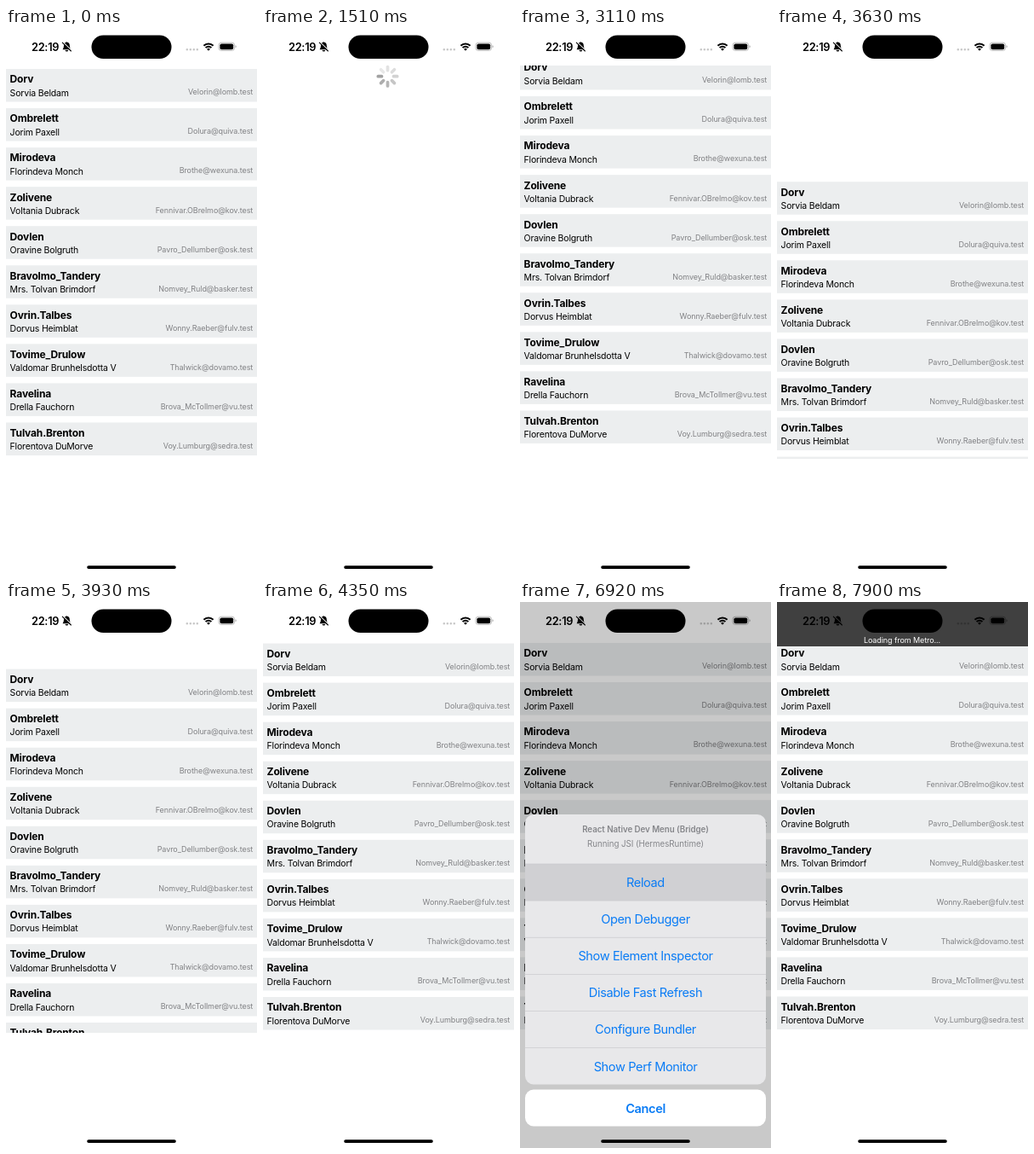
Write an HTML page that moves like this. It is 295 by 640 pixels and loops after 8 s.

```html
<!DOCTYPE html>
<html lang="en">
<head>
<meta charset="utf-8">
<title>User list with reload menu</title>
<style>
  html, body { margin: 0; width: 100%; height: 100%; overflow: hidden; background: #fff; }
  svg { display: block; width: 100%; height: 100%; font-family: Inter, Roboto, sans-serif; }
  .title { font-size: 12px; font-weight: 700; letter-spacing: -.15px; }
  .name { font-size: 10.5px; letter-spacing: -.18px; }
  .small { font-size: 9px; letter-spacing: -.08px; }
  .mail { fill: #808184; text-anchor: end; }
  .clock { font-size: 12.8px; font-weight: 600; letter-spacing: -.3px; }
  .mid { text-anchor: middle; }
  .head { font-size: 9.75px; letter-spacing: -.05px; fill: #85868a; }
  .button { font-size: 14.6px; letter-spacing: -.4px; fill: #0a7cf5; }
  .strong { font-weight: 600; }
</style>
</head>
<body>
<svg viewBox="0 0 295 640">
  <defs>
    <clipPath id="listArea"><rect y="44" width="295" height="461"/></clipPath>
    <clipPath id="sheetArea"><rect x="6" y="249" width="283" height="316.5" rx="10"/></clipPath>
    <mask id="slashGap" maskUnits="userSpaceOnUse" x="64" y="14" width="16" height="16">
      <rect x="64" y="14" width="16" height="16" fill="#fff"/>
      <path d="M66 15.8 L78 27.2" stroke="#000" stroke-width="1.3"/>
    </mask>
  </defs>
  <rect width="295" height="640" fill="#fff"/>
  <g id="listBox" clip-path="url(#listArea)"><g id="list"></g></g>
  <g id="spinner" stroke-width="3.7" stroke-linecap="round"></g>
  <g id="banner">
    <rect width="295" height="52" fill="#404040"/>
    <text class="small mid" x="147" y="47.5" fill="#fff">Loading from Metro...</text>
  </g>
  <rect id="dim" width="295" height="640"/>
  <g id="sheet">
    <g clip-path="url(#sheetArea)">
      <rect x="6" y="249" width="283" height="317" fill="#e8e8ea"/>
      <rect id="pressed" x="6" y="307" width="283" height="43" fill="#d0d0d3"/>
      <g id="buttons"></g>
    </g>
    <text class="head strong mid" x="147.5" y="269.5">React Native Dev Menu (Bridge)</text>
    <text class="head mid" x="147.5" y="286.5">Running JSI (HermesRuntime)</text>
    <rect x="6" y="571.5" width="283" height="43" rx="10" fill="#fff"/>
    <text class="button strong mid" x="147.5" y="598.5">Cancel</text>
  </g>
  <g id="status">
    <text class="clock" x="30" y="26.6">22:19</text>
    <g mask="url(#slashGap)">
      <path d="M66.6 25.3 Q68 23.6 68 20.6 Q68.2 17.4 70.3 17.1 Q71.4 15.6 72.5 17.1 Q74.6 17.4 74.8 20.6 Q74.8 23.6 76.2 25.3 Z"/>
      <path d="M69.6 26 a1.8 1.6 0 0 0 3.6 0 Z"/>
    </g>
    <path d="M66.3 17.2 L76.4 27" stroke="#000" stroke-width="1.1" stroke-linecap="round"/>
    <rect x="100.5" y="8.4" width="94" height="27.7" rx="13.85"/>
    <path d="M212.8 25.2 h13" stroke="#000" stroke-opacity=".22" stroke-width="2.6" stroke-linecap="round" stroke-dasharray="0 4"/>
    <g fill="none" stroke="#000" stroke-width="2">
      <path d="M232.4 20.7 a8 8 0 0 1 11.2 0"/>
      <path d="M234.6 23.1 a4.8 4.8 0 0 1 6.8 0"/>
    </g>
    <path d="M238 26.8 l-1.9 -2 a2.7 2.7 0 0 1 3.8 0 Z"/>
    <rect x="250" y="17.2" width="18.6" height="9.2" rx="3" fill="none" stroke="#000" stroke-opacity=".35" stroke-width=".75"/>
    <rect x="251.4" y="18.4" width="15.8" height="6.8" rx="1.9"/>
    <path d="M269.6 20.2 a1.6 1.6 0 0 1 0 3 Z" fill-opacity=".4"/>
  </g>
  <rect x="95.2" y="630.2" width="104.6" height="3.8" rx="1.9"/>
</svg>
<script>
const $ = id => document.getElementById(id);

const users = [
  ["Dorv", "Sorvia Beldam", "Velorin@lomb.test"],
  ["Ombrelett", "Jorim Paxell", "Dolura@quiva.test"],
  ["Mirodeva", "Florindeva Monch", "Brothe@wexuna.test"],
  ["Zolivene", "Voltania Dubrack", "Fennivar.OBrelmo@kov.test"],
  ["Dovlen", "Oravine Bolgruth", "Pavro_Dellumber@osk.test"],
  ["Bravolmo_Tandery", "Mrs. Tolvan Brimdorf", "Nomvey_Ruld@basker.test"],
  ["Ovrin.Talbes", "Dorvus Heimblat", "Wonny.Raeber@fulv.test"],
  ["Tovime_Drulow", "Valdomar Brunhelsdotta V", "Thalwick@dovamo.test"],
  ["Ravelina", "Drella Fauchorn", "Brova_McTollmer@vu.test"],
  ["Tulvah.Brenton", "Florentova DuMorve", "Voy.Lumburg@sedra.test"]
];
$("list").innerHTML = users.map(([title, name, mail], i) => `
  <g transform="translate(0 ${48 + i * 46.05})">
    <rect width="295" height="38.5" fill="#eceeef"/>
    <text class="title" x="4.6" y="16.4">${title}</text>
    <text class="name" x="4.6" y="31.6">${name}</text>
    <text class="small mail" x="290.2" y="30.4">${mail}</text>
  </g>`).join("");

const actions = ["Reload", "Open Debugger", "Show Element Inspector",
  "Disable Fast Refresh", "Configure Bundler", "Show Perf Monitor"];
$("buttons").innerHTML = actions.map((label, i) => `
  <rect x="6" y="${306.7 + i * 43.1}" width="283" height=".6" fill="#c6c6ca"/>
  <text class="button mid" x="147.5" y="${334 + i * 43.1}">${label}</text>`).join("");

// Spoke greys, from the leading spoke on the left backwards
const greys = [162, 174, 182, 198, 210, 220, 226, 232];
$("spinner").innerHTML = greys.map((v, i) =>
  `<path d="M-7 0 H-11.2" stroke="rgb(${v},${v},${v})" transform="rotate(${-45 * i})"/>`).join("");

const LOOP = 8000;
const progress = (t, from, to) => Math.min(1, Math.max(0, (t - from) / (to - from)));
const easeOut = (p, power) => 1 - (1 - p) ** power;
const show = (id, visible) => $(id).setAttribute("visibility", visible ? "visible" : "hidden");

function scrollOffset(t) {
  if (t < 2600 || t >= 5900) return 0;
  if (t < 3310) return -6 - 14.6 * Math.sin(Math.PI * progress(t, 2670, 3210));
  if (t < 3750) return -6 + 157.5 * Math.sin(Math.PI / 2 * progress(t, 3310, 3750));
  return Math.max(.5, 151.5 * Math.exp(-(t - 3750) / 100));
}

function sheetAmount(t) {
  return t < 6910 ? easeOut(progress(t, 5850, 6400), 5)
                  : 1 - easeOut(progress(t, 6910, 7460), 3);
}

function draw(now) {
  const t = now % LOOP;
  // Motion is sampled at ten steps per second
  const step = Math.floor((t - 10) / 100) * 100 + 10;

  show("listBox", t < 720 || t >= 2670);
  $("list").setAttribute("transform", `translate(0 ${scrollOffset(step)})`);

  show("spinner", t >= 930 && t < 2670);
  const turn = 45 * Math.round((Math.min(step, 1510) - 1510) / 100);
  $("spinner").setAttribute("transform", `translate(146.5 56.7) rotate(${turn})`);

  show("banner", t >= 500 && t < 1290 || t >= 7900);
  $("banner").setAttribute("opacity", t < 7900 ? 1 - progress(step, 900, 1250) : 1);

  const amount = sheetAmount(step);
  show("sheet", amount > 0);
  $("pressed").setAttribute("opacity", t >= 6920 ? 1 : 0);
  $("dim").setAttribute("opacity", .21 * amount);
  $("sheet").setAttribute("transform", `translate(0 ${391 * (1 - amount)})`);
}

const start = performance.now();
function tick() {
  draw(performance.now() - start);
  requestAnimationFrame(tick);
}
tick();
</script>
</body>
</html>
```
